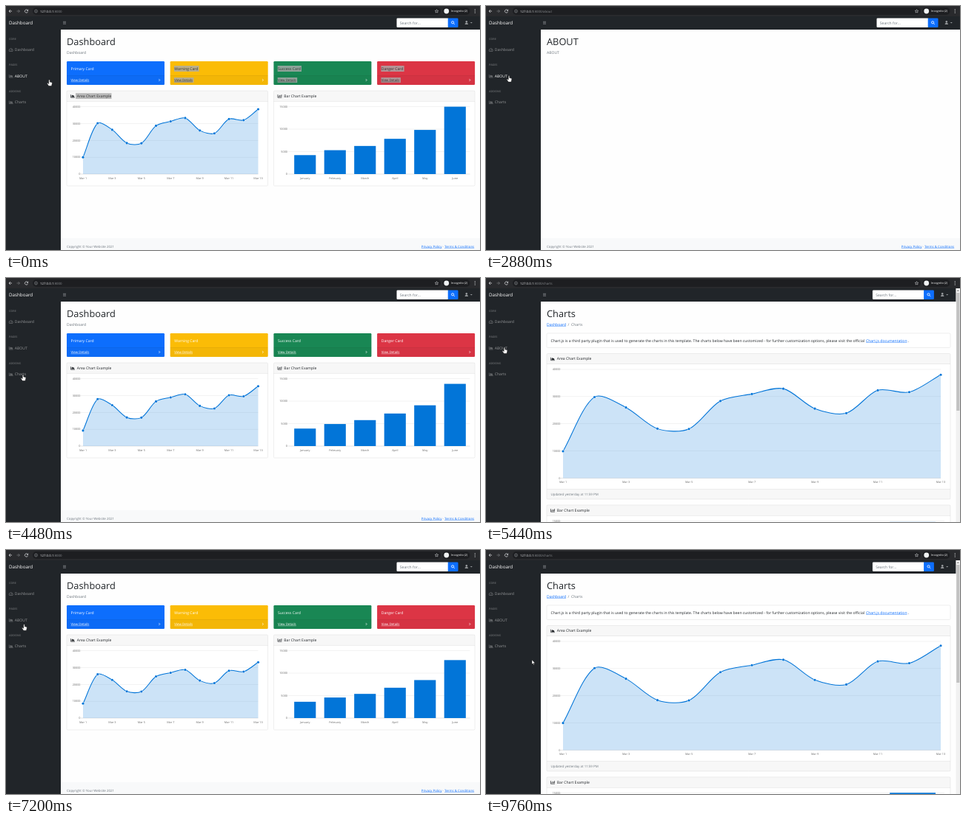
An HTML page with a canvas that plays this animation: 640 px wide and 331 px high, repeating every 9840 ms.

```html
<!DOCTYPE html>
<html lang="en">
<head>
<meta charset="utf-8">
<title>Dashboard</title>
<style>
  html, body { margin: 0; width: 100%; height: 100%; overflow: hidden; background: #fff; }
  canvas { display: block; width: 640px; height: 331px; }
</style>
</head>
<body>
<canvas id="stage" width="640" height="331"></canvas>
<script>
const ctx = document.getElementById('stage').getContext('2d');
ctx.textRendering = 'geometricPrecision';

const LOOP = 9840;
const DARK = '#212529', GREY = '#6c757d', BLUE = '#0d6efd', CHART = '#0275d8', EDGE = 'rgba(0,0,0,.125)';
const BODY = 5.07, SMALL = 4.42, TICK = 3.8;

// Start time, page, and when its charts began to grow
const PAGES = [
  [0, 'dashboard', -2000], [1760, 'about', 0], [4007, 'dashboard', 4007], [5280, 'charts', 4760],
  [5680, 'about', 0], [6812, 'dashboard', 6812], [8400, 'charts', 7880],
];
// Time and position of the pointer tip
const POINTER = [
  [0, 58.5, 100], [160, 58.5, 100], [480, 31, 66], [1440, 31, 66], [1600, 28.5, 94], [1760, 28.5, 94],
  [2080, 31, 94.5], [3280, 31, 94.5], [3600, 24, 58], [4080, 24, 58], [4400, 23, 131], [5200, 23, 131],
  [5360, 25, 94], [6480, 25, 94], [6640, 24, 58], [6960, 24, 58], [7200, 24.5, 100.5], [7360, 23, 131],
  [8800, 23, 131], [9200, 62, 149], [LOOP, 62, 149],
];
const AREA = [10000, 30162, 26263, 18394, 18287, 28682, 31274, 33259, 25849, 24159, 32651, 31984, 38451];
const BARS = [4215, 5312, 6251, 7841, 9821, 14984];
const MONTHS = ['January', 'February', 'March', 'April', 'May', 'June'];
const MENU = [['CORE', 'Dashboard', 59.5], ['PAGES', 'ABOUT', 95], ['ADDONS', 'Charts', 130.5]];

function text(str, x, y, size = BODY, color = DARK, align = 'left', weight = 400) {
  ctx.font = `${weight} ${size}px "Open Sans", "Noto Sans", sans-serif`;
  ctx.textAlign = align;
  ctx.fillStyle = color;
  ctx.fillText(str, x, y + size * .35);
}

function link(str, x, y, size = BODY, color = BLUE) {
  text(str, x, y, size, color);
  rect(x, y + size * .5, ctx.measureText(str).width, .4, color);
}

function rect(x, y, w, h, color) {
  ctx.fillStyle = color;
  ctx.fillRect(x, y, w, h);
}

function box(x, y, w, h, fill, r = 1.3, edge) {
  ctx.beginPath();
  ctx.roundRect(x, y, w, h, r);
  ctx.fillStyle = fill;
  ctx.fill();
  if (edge) { ctx.strokeStyle = edge; ctx.lineWidth = .5; ctx.stroke(); }
}

function disc(x, y, r, color) {
  ctx.beginPath();
  ctx.arc(x, y, r, 0, 7);
  ctx.fillStyle = color;
  ctx.fill();
}

function shape(d, x, y, fill, stroke, width = .7) {
  const path = new Path2D(d);
  ctx.save();
  ctx.translate(x, y);
  if (fill) { ctx.fillStyle = fill; ctx.fill(path); }
  if (stroke) { ctx.strokeStyle = stroke; ctx.lineWidth = width; ctx.stroke(path); }
  ctx.restore();
}

function areaIcon(x, y, color) {
  shape('M0 -2V2H5.4', x, y, null, color);
  shape('M1 1.2V-.2L2.2 -1.6L3.4 -.4L4.2 -1L5 1.2Z', x, y, color);
}

function barIcon(x, y, color) {
  shape('M0 -2V2H5.4M1.5 1V-.3M2.7 1V-1.4M3.9 1V-.6M5 1V-2', x, y, null, color);
}

function pointerAt(t) {
  const i = Math.max(1, POINTER.findIndex(k => k[0] >= t));
  const [t0, x0, y0] = POINTER[i - 1], [t1, x1, y1] = POINTER[i];
  const u = Math.max(0, (t - t0) / (t1 - t0));
  return [x0 + (x1 - x0) * u, y0 + (y1 - y0) * u];
}

const menuRow = y => MENU.findIndex(m => Math.abs(y - m[2]) < 9);

function grid(left, right, top, bottom, max, step) {
  for (let v = 0; v <= max; v += step) {
    const y = bottom - (bottom - top) * v / max;
    rect(left - 3, y - .2, right - left + 3, .4, v ? EDGE : 'rgba(0,0,0,.25)');
    text(v, left - 3.5, y, TICK, '#666', 'right');
  }
}

function areaChart(left, right, top, bottom, grow) {
  grid(left, right, top, bottom, 40000, 10000);
  const pts = AREA.map((v, i) => [left + (right - left) * i / 12, bottom - (bottom - top) * v / 40000 * grow]);
  const dist = (a, b) => Math.hypot(a[0] - b[0], a[1] - b[1]);
  const handles = pts.map((p, i) => {
    const a = pts[i - 1] || p, b = pts[i + 1] || p;
    const da = dist(a, p), db = dist(p, b), k = .3 / (da + db);
    const at = f => [p[0] + f * (b[0] - a[0]), Math.min(bottom, Math.max(top, p[1] + f * (b[1] - a[1])))];
    return [at(-k * da), at(k * db)];
  });
  ctx.beginPath();
  ctx.moveTo(...pts[0]);
  for (let i = 1; i < pts.length; i++) ctx.bezierCurveTo(...handles[i - 1][1], ...handles[i][0], ...pts[i]);
  ctx.strokeStyle = CHART;
  ctx.lineWidth = 1.05;
  ctx.stroke();
  ctx.lineTo(right, bottom);
  ctx.lineTo(left, bottom);
  ctx.fillStyle = 'rgba(2,117,216,.2)';
  ctx.fill();
  pts.forEach(([x, y], i) => {
    disc(x, y, 1.95, 'rgba(255,255,255,.8)');
    disc(x, y, 1.55, CHART);
    if (i % 2 === 0) text('Mar ' + (i + 1), x, bottom + 5.5, TICK, '#666', 'center');
  });
}

function barChart(left, right, top, bottom, grow) {
  grid(left, right, top, bottom, 15000, 5000);
  const step = (right - left) / 6;
  BARS.forEach((v, i) => {
    const x = left + step * (i + .5), h = (bottom - top) * v / 15000 * grow;
    rect(x - step * .36, bottom - h, step * .72, h, CHART);
    text(MONTHS[i], x, bottom + 5.5, TICK, '#666', 'center');
  });
}

function panel(x, y, w, h, title, icon, marked) {
  box(x, y, w, h, '#fff', 1.3, EDGE);
  rect(x + .2, y + .2, w - .4, 14, 'rgba(0,0,0,.03)');
  rect(x, y + 14, w, .5, EDGE);
  icon(x + 5.5, y + 7.2, DARK);
  if (marked) rect(x + 12, y + 3.2, 48.5, 7.8, marked.fill);
  text(title, x + 13.8, y + 7.2, BODY, marked ? marked.ink : DARK);
}

function header(title) {
  text(title, 82, 48.8, 12.8, DARK, 'left', 500);
}

function footer() {
  rect(74, 315, 566, 16, '#f8f9fa');
  text('Copyright © Your Website 2021', 82, 326, SMALL, GREY);
  link('Privacy Policy', 560.8, 326, SMALL);
  text('·', 589.5, 326, SMALL, GREY);
  link('Terms & Conditions', 592, 326, SMALL);
}

const draw = {
  dashboard(grow, t) {
    const marked = t < 640 ? { fill: 'rgba(172,172,172,.8)', ink: '#323232' }
      : t < 1760 ? { fill: '#2380d8', ink: '#fff' } : null;
    header('Dashboard');
    text('Dashboard', 82, 63, BODY, GREY);
    [['Primary', BLUE], ['Warning', '#fbbc06'], ['Success', '#198754'], ['Danger', '#dc3545']].forEach(([name, color], i) => {
      const x = 82 + 139.7 * i, title = name + ' Card', on = i && marked;
      box(x, 75, 132, 32, color);
      rect(x, 94, 132, 13, 'rgba(0,0,0,.03)');
      rect(x, 94, 132, .4, EDGE);
      if (on) {
        ctx.font = `${BODY}px "Open Sans", "Noto Sans", sans-serif`;
        rect(x + 5.3, 81, ctx.measureText(title).width + 1.5, 8, on.fill);
        rect(x + 5.3, 97, 26.5, 7, on.fill);
      }
      const ink = on ? on.ink : '#fff';
      text(title, x + 5.6, 85, BODY, ink);
      link('View Details', x + 5.6, 100.5, SMALL, ink);
      shape('M-.7 -1.5L.8 0L-.7 1.5', x + 125, 100.5, null, '#fff');
    });
    panel(82, 115, 271.5, 129, 'Area Chart Example', areaIcon, marked);
    panel(361.5, 115, 271.5, 129, 'Bar Chart Example', barIcon);
    areaChart(104, 340.5, 136.5, 228, grow);
    barChart(383.5, 626.5, 136.5, 228, grow);
    footer();
  },
  about() {
    header('ABOUT');
    text('ABOUT', 82, 63, BODY, GREY);
    footer();
  },
  charts(grow) {
    header('Charts');
    link('Dashboard', 82, 63);
    text('/', 110.5, 63, BODY, GREY);
    text('Charts', 115, 63, BODY, GREY);
    box(82, 75, 545, 19.5, '#fff', 1.3, EDGE);
    text('Chart.js is a third party plugin that is used to generate the charts in this template. The charts below have been customized - for further customization options, please visit the official', 87.5, 85);
    link('Chart.js documentation', 513, 85);
    text('.', 569.7, 85);
    panel(82, 102.5, 545, 197.5, 'Area Chart Example', areaIcon);
    areaChart(104, 614, 124, 271.5, grow);
    rect(82.2, 286.7, 544.6, 13.2, 'rgba(0,0,0,.03)');
    rect(82, 286.5, 545, .5, EDGE);
    text('Updated yesterday at 11:59 PM', 87.5, 293.8, SMALL, GREY);
    panel(82, 308, 545, 190, 'Bar Chart Example', barIcon);
    barChart(104, 619, 329.2, 476.7, grow);
    rect(634.5, 14, 5.5, 317, '#f1f1f1');
    rect(635.2, 20, 4.2, 160, '#c1c1c1');
    shape('M-1.3 .7L0 -.8L1.3 .7Z', 637.3, 17, '#505050');
  },
};

function browserBar(page) {
  rect(0, 0, 640, 14, '#292a2d');
  box(36, 2, 551, 10, '#1d1e21', 5);
  shape('M2 0H-2M0 -2L-2 0L0 2', 6, 7, null, '#e8eaed');
  shape('M-2 0H2M0 -2L2 0L0 2', 16.5, 7, null, '#77797d');
  shape('M1.7 -1.2A2.1 2.1 0 1 0 2 .7M2.2 -2.3V-.6H.5', 27.5, 7, null, '#e8eaed');
  shape('M2 0A2 2 0 1 1 -2 0A2 2 0 1 1 2 0M0 -.3V1.1M0 -1.2V-.8', 40.5, 7, null, '#a5a8ac', .5);
  text('127.0.0.1', 46, 7, 4.35, '#e8eaed');
  const end = 46 + ctx.measureText('127.0.0.1').width;
  text(':8000' + (page === 'dashboard' ? '' : '/' + page), end, 7, 4.35, '#8b8e92');
  shape('M0 -2.3L.7 -.7L2.3 -.6L1.1 .5L1.5 2.1L0 1.2L-1.5 2.1L-1.1 .5L-2.3 -.6L-.7 -.7Z', 581.5, 7, null, '#dcdee0', .5);
  box(589.5, 2, 37, 10, '#1d1e21', 5);
  disc(594.7, 7, 3.4, '#f1f3f4');
  text('Incognito (2)', 601, 7, 3.85, '#fff');
  for (const y of [4.9, 7, 9.1]) disc(633.2, y, .55, '#e8eaed');
}

function navbar(shift) {
  rect(0, 14, 640 - shift, 18, DARK);
  text('Dashboard', 4, 23, 6.25, '#fff');
  shape('M-2 -1.5H2M-2 0H2M-2 1.5H2', 79, 22.8, null, '#9a9da0', .6);
  ctx.save();
  ctx.translate(-shift, 0);
  box(527.5, 16.5, 70, 12.6, '#fff');
  text('Search for...', 531.8, 22.8, BODY, GREY);
  box(596.7, 16.5, 13.8, 12.6, BLUE, [0, 1.3, 1.3, 0]);
  shape('M1 -.4A1.6 1.6 0 1 1 -2.2 -.4A1.6 1.6 0 1 1 1 -.4M.6 .8L2.2 2.3', 603.7, 22.7, null, '#fff', .8);
  disc(621.8, 21.4, 1.3, '#9a9da0');
  shape('M-2.3 2.3Q-2.3 .2 0 .2Q2.3 .2 2.3 2.3Z', 621.8, 22.8, '#9a9da0');
  shape('M-1.5 -.7H1.5L0 .8Z', 628.3, 22.8, '#9a9da0');
  ctx.restore();
}

function sidebar(hover) {
  rect(0, 32, 74, 299, DARK);
  MENU.forEach(([group, name, y], i) => {
    const ink = i === hover ? '#fff' : 'rgba(255,255,255,.52)', icon = 'rgba(255,255,255,.32)';
    text(group, 4, y - 15, 3.7, 'rgba(255,255,255,.27)', 'left', 700);
    if (i) areaIcon(4.3, y, icon);
    else shape('M-2.2 1.7A2.5 2.5 0 1 1 2.2 1.7ZM0 .8L1 -1', 6.7, y + .2, null, icon, .8);
    text(name, 11.8, y, BODY, ink);
  });
}

function pointer(x, y) {
  if (menuRow(y) >= 0) {
    shape('M-.8 .6Q0 -.4 .8 .6V3L3.2 3.6Q4 4 3.8 5.2L3 8.6H-.8L-3 5.2Q-2.8 4.2 -1.8 4.8L-.8 5.6Z', x, y, '#fff', '#111', .5);
  } else {
    shape('M0 0V6L1.4 4.8L2.3 6.8L3.2 6.4L2.3 4.5H4.2Z', x, y, '#fff', '#111', .4);
  }
}

function render(t) {
  const [, page, start] = PAGES.findLast(p => p[0] <= t);
  const progress = Math.min(1, (t - start) / 1000);
  rect(0, 0, 640, 331, '#fefefe');
  draw[page](1 - (1 - progress) ** 4, t);
  sidebar(menuRow(pointerAt(Math.max(0, t - 160))[1]));
  navbar(page === 'charts' ? 5.6 : 0);
  browserBar(page);
  pointer(...pointerAt(t));
}

const begin = performance.now();
(function tick() {
  render((performance.now() - begin) % LOOP);
  requestAnimationFrame(tick);
})();
</script>
</body>
</html>
```
